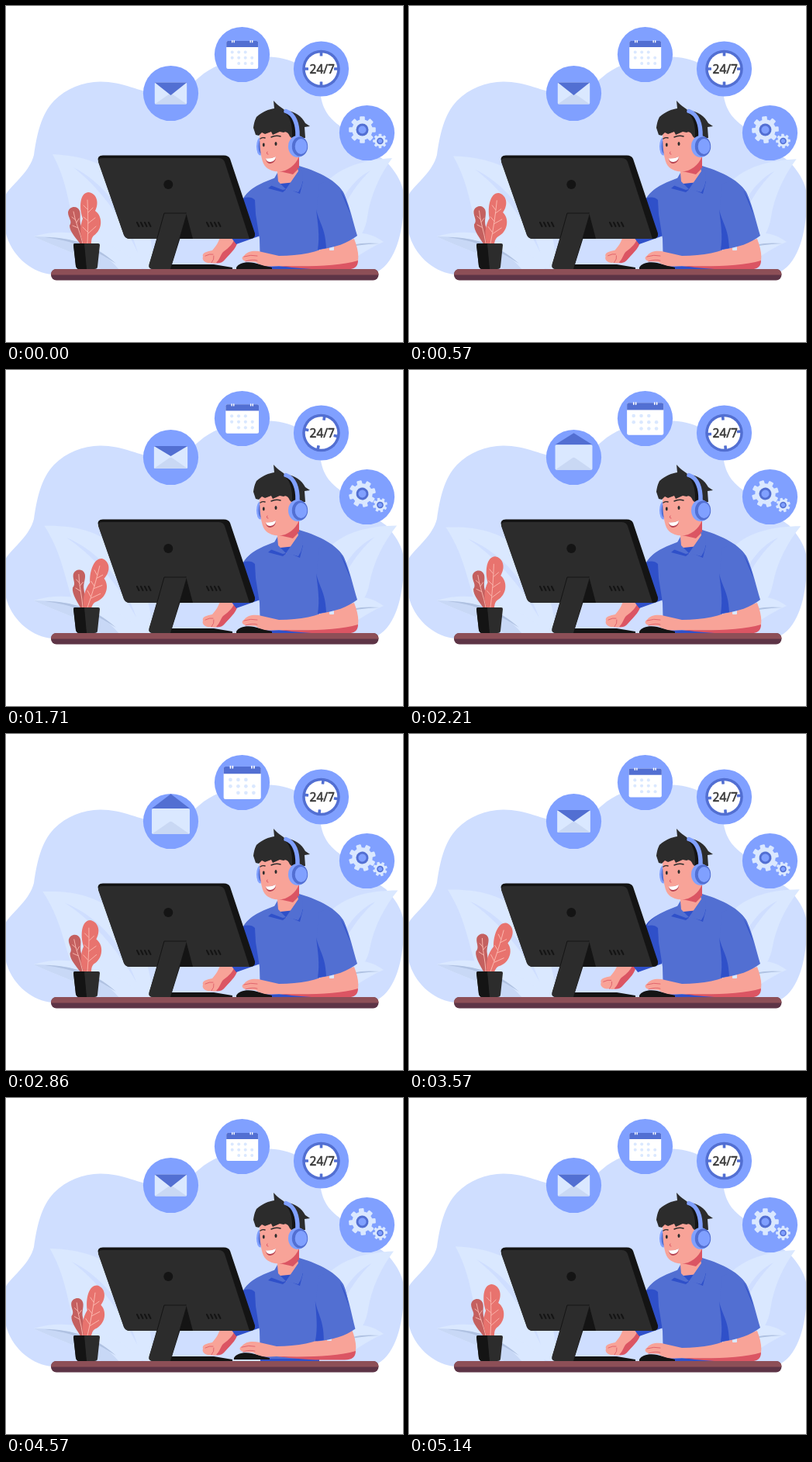
An HTML page with a canvas for the animation above (5210 ms loop, 512x433 px).

```html
<!DOCTYPE html>
<html lang="en">
<head>
<meta charset="utf-8">
<title>Support desk</title>
<style>
html, body { margin: 0; width: 100%; height: 100%; overflow: hidden; background: #fff; }
canvas { display: block; width: 100%; height: 100%; }
</style>
</head>
<body>
<canvas id="stage" width="512" height="433"></canvas>
<script>
const ctx = document.getElementById('stage').getContext('2d');
const LOOP = 5210, TAU = Math.PI * 2;
const C = {
  cloud: '#cfdeff', leaf: '#dae8ff', lowLeaf: '#c8d8f6', vein: '#b0c2e2',
  disc: '#80a0ff', blue: '#526fd2', navy: '#2f50c9', pale: '#dae8ff',
  skin: '#f8a398', red: '#db5563', ink: '#2c2c2c', black: '#141414',
  plant: '#e8736e', plantDark: '#c4605f', plantVein: '#fbb9b0'
};

// Drawing helpers
const paths = {};
const path = d => paths[d] || (paths[d] = new Path2D(d));
function fill(d, color) {
  ctx.fillStyle = color;
  ctx.fill(path(d));
}
function line(d, color, width = 1) {
  ctx.strokeStyle = color;
  ctx.lineWidth = width;
  ctx.lineCap = ctx.lineJoin = 'round';
  ctx.stroke(path(d));
}
function ellipse(x, y, rx, ry, color) {
  ctx.fillStyle = color;
  ctx.beginPath();
  ctx.ellipse(x, y, rx, ry, 0, 0, TAU);
  ctx.fill();
}
const circle = (x, y, r, color) => ellipse(x, y, r, r, color);
function box(x, y, w, h, r, color) {
  ctx.fillStyle = color;
  ctx.beginPath();
  ctx.roundRect(x, y, w, h, r);
  ctx.fill();
}
function at(x, y, draw, angle = 0, scale = 1) {
  ctx.save();
  ctx.translate(x, y);
  ctx.rotate(angle);
  ctx.scale(scale, scale);
  draw();
  ctx.restore();
}
const pivot = (x, y, angle, draw) => at(x, y, () => {
  ctx.translate(-x, -y);
  draw();
}, angle);

// Timing helpers
const clamp = u => Math.min(1, Math.max(0, u));
const span = (t, a, b) => clamp((t - a) / (b - a));
const bump = (t, a, b) => Math.sin(Math.PI * span(t, a, b)) ** 2;
const cubic = u => u < .5 ? 4 * u ** 3 : 1 - 4 * (1 - u) ** 3;
const slowSway = t => Math.sin(Math.PI * t / LOOP) ** 1.4;

function backdrop(t) {
  fill('M60 346C35 344 10 325 1 297C-4 280 -4 255 -1 244C9 228 30 215 36 192C40 165 45 140 62 122C80 104 105 95 132 98C160 101 180 114 206 114C228 114 238 101 249 92C257 85 265 80 275 76C305 66 335 62 358 68C384 74 402 92 406 117C410 138 420 147 434 157C444 182 470 184 490 200C505 216 514 232 513 250C513 288 503 338 470 346Z', C.cloud);
  const sway = slowSway(t);
  pivot(190, 340, -.09 * sway, () => {
    fill('M60 191C100 193 128 203 150 225C180 255 190 300 190 340C150 335 100 320 88 285C80 250 78 225 60 191Z', C.leaf);
    fill('M87 208C122 226 155 262 170 318C148 270 118 232 87 208Z', C.cloud);
  });
  pivot(400, 335, .055 * sway, () => {
    fill('M498 196C460 198 432 208 414 226C398 250 394 300 400 337C435 322 462 304 466 272C470 244 482 218 498 196Z', C.leaf);
    fill('M470 212C442 226 420 264 411 318C426 274 444 236 470 212Z', C.cloud);
  });
  fill('M36 297C62 289 92 290 120 302C150 314 168 328 176 340H124C100 320 66 312 36 297Z', C.leaf);
  fill('M36 297C84 297 120 308 146 340H124C100 320 66 312 36 297Z', C.lowLeaf);
  fill('M50 298C84 298 116 308 142 332C112 312 86 303 50 298Z', C.vein);
  fill('M487 304C468 290 446 288 428 304L420 335C450 330 458 316 487 304Z', C.leaf);
  fill('M482 306C460 304 444 307 432 314C446 309 462 307 482 306Z', C.vein);
}

function envelope(open) {
  at(212.5, 112.5, () => {
    const tip = -14 + 16.5 * Math.cos(Math.PI * open);
    const flap = () => {
      ctx.fillStyle = C.blue;
      ctx.beginPath();
      ctx.moveTo(-20.7, -14);
      ctx.lineTo(0, tip);
      ctx.lineTo(20.7, -14);
      ctx.fill();
    };
    if (tip < -14) flap();
    box(-20.7, -14, 41.4, 28, 1.5, C.pale);
    fill('M-20 13.5L-2 1Q0 -.5 2 1L20 13.5Q19 14 18 14H-18Q-19 14 -20 13.5Z', '#c9d8f4');
    if (tip >= -14) flap();
  }, 0, 1 + .2 * open);
}

function calendar(open) {
  at(304.7, 63, () => {
    box(-20.5, -18, 41, 36, 2, '#fff');
    box(-20.5, -18, 41, 8, [2, 2, 0, 0], C.blue);
    for (const x of [-13, -10.5, 10.5, 13]) box(x - .7, -19, 1.4, 3.5, .7, '#fff');
    for (let row = 0; row < 3; row++)
      for (let col = 0; col < 4; col++) {
        const empty = row === 0 && col === 3 || row === 2 && col === 0;
        if (!empty) circle(-13 + col * 8.5, -3.5 + row * 7.2, 2, C.pale);
      }
  }, 0, 1 + .19 * open);
}

function clock(t) {
  const turn = cubic(span(t, 1350, 2480)) + cubic(span(t, 2480, 3907));
  circle(406.5, 81, 24.3, C.blue);
  circle(406.5, 81, 20.8, '#fff');
  at(406.5, 81, () => {
    for (let i = 0; i < 4; i++) {
      box(-1.8, -22.5, 3.6, 6, .5, C.blue);
      ctx.rotate(Math.PI / 2);
    }
  }, turn * Math.PI / 2);
  ctx.font = '15.5px "Noto Sans", "Open Sans", sans-serif';
  ctx.textAlign = 'center';
  ctx.textBaseline = 'alphabetic';
  ctx.fillStyle = ctx.strokeStyle = '#3a3a3a';
  ctx.lineWidth = .6;
  ctx.fillText('24/7', 407.8, 86.8);
  ctx.strokeText('24/7', 407.8, 86.8);
}

function gear(x, y, r, angle) {
  at(x, y, () => {
    for (let i = 0; i < 8; i++) {
      box(-r * .19, -r, r * .38, r, r * .07, C.pale);
      ctx.rotate(TAU / 8);
    }
    circle(0, 0, r * .76, C.pale);
    circle(0, 0, r * .46, C.blue);
    circle(0, 0, r * .29, C.disc);
  }, angle);
}

function icons(t) {
  const open = bump(t, LOOP / 4, LOOP * 3 / 4);
  for (const [x, y] of [[212.5, 112.5], [304.5, 62.5], [406.5, 81], [465.5, 163.5]])
    circle(x, y, 35.6, C.disc);
  envelope(open);
  calendar(open);
  clock(t);
  const turn = -.31 * slowSway(t);
  gear(459.5, 159.5, 17.3, turn);
  gear(482.5, 174, 9.3, turn);
}

function leftArm(t) {
  const reach = bump(t, 0, 620) + bump(t, 2930, 4000);
  at(-7 * reach, -3 * reach, () => {
    fill('M276 298L300 298C298 310 290 317 284 324C279 331 270 333 264 331C258 332 252 328 254 323C252 318 260 316 266 315C272 308 274 304 276 298Z', C.skin);
    fill('M299 299C300 310 290 318 283 326C279 331 275 332 271 331C276 326 277 320 280 317C288 311 293 306 295 299Z', C.red);
    line('M257 322Q263 319 267 320M265 331Q269 326 268 322', C.red, .8);
  });
  at(-2 * reach, 0, () => {
    fill('M335 228C317 234 308 242 303 254L290 298L297 307L328 296V240Z', C.navy);
  });
}

function torso() {
  fill('M351 220C335 226 316 232 307 247C312 246 318 246 321 250L322 268L327 300L328 339H403L404 314C420 312 440 306 445 296C444 274 440 250 435 240C424 222 398 212 378 206Z', C.blue);
  fill('M328 336H404V339H328Z', C.navy);
  fill('M350 204L378 190V212L361 237L350 228Z', C.skin);
  fill('M378 192V209L370 217C363 215 357 214 352 213C364 210 373 203 378 192Z', C.red);
  fill('M344 230L338 235L357 240L363 235L379 242L383 226Z', C.navy);
  fill('M350 215L341 231L357 237L361 236L351 226Z', C.blue);
  fill('M376 208L377 213L361 236L377 240Q385 229 382 213Z', C.blue);
}

function rightArm(t) {
  const slide = bump(t, 600, 1660) + bump(t, 3800, 5150);
  at(-3.2 * slide, -2 * slide, () => {
    fill('M297 337C300 331 310 329 320 331L343 337V339H297Z', C.black);
    fill('M307 322C312 315 322 315 330 317L352 322C380 322 402 317 420 308L449 300C456 318 456 331 450 336C440 340 380 337 352 335C340 336 330 336 322 330L309 329C303 327 304 323 307 322Z', C.skin);
    fill('M354 335C395 336 430 335 454 328C454 336 449 339.5 440 339.5H402C380 338 366 337 354 335Z', C.red);
    line('M307 323Q316 320 324 322M309 329Q318 326 324 328', C.red, .8);
    box(417, 310, 6, 5, 1, C.pale);
  });
  pivot(415, 230, .04 * slide, () => {
    fill('M403 230C414 222 430 230 436 242C444 260 448 280 453 296C440 306 425 311 404 314L401 262Z', C.blue);
    fill('M400 262C404 280 412 286 413 312L402 314C405 296 402 280 400 262Z', C.navy);
    fill('M431 237C438 248 442 260 444 268C440 258 436 248 431 237Z', C.navy);
  });
}

function head() {
  ellipse(328, 181, 5, 11.5, C.disc);
  ellipse(329.5, 181, 4, 9.5, C.blue);
  fill('M327 160C327 178 328 194 332 203C337 213 350 215 360 212C371 207 378 199 380 186L378 158L350 148Z', C.skin);
  fill('M322 166L319 157C320 150 321 147 323 143C331 136 339 133 346 132L345 122C350 128 356 131 359 134C374 136 381 142 386 151L392 155L385 156L386 170H368L366 168C364 163 361 161 358 163L353 162L344 166L342 162L334 165L330 163L326 167Z', C.ink);
  fill('M356 135C366 140 370 152 369 170H377C378 152 370 138 356 135Z', C.black);
  line('M361 135.5C372 139 376.5 153 376 168', C.disc, 5.5);
  ellipse(376, 181, 12, 14, C.disc);
  ellipse(379, 181, 10.2, 12.6, C.blue);
  ellipse(380.5, 181, 7.8, 10, C.disc);
  ellipse(332.3, 179, 1.4, 2.4, C.ink);
  ellipse(348, 177.5, 1.5, 2.5, C.ink);
  line('M328 171Q331 169 334 170M342 169Q348 166 354 168', C.ink, 1.4);
  line('M337 188Q335 191 338 191', C.red, 1);
  fill('M335 197Q342 197 348 194Q348 202 341 203Q336 203 335 197Z', '#b5404f');
  fill('M335 196.5Q342 197 348 194Q347.5 200 341 201Q336 201 335 196.5Z', '#fff');
}

function monitor() {
  fill('M204 266H235L214 333H268L292 337V339H190Q183 339 185 332Z', C.black);
  fill('M125 192.5H281Q287 192.5 289 197L321 293Q322 300 315 300H160Q154 300 152 295L119 200Q117 192.5 125 192.5Z', C.black);
  fill('M125 196H274Q280 196 282 201L314 300H160Q154 300 152 295L119 201Q118 196 125 196Z', C.ink);
  circle(209.3, 230, 6, C.black);
  for (const x of [169, 259])
    for (let i = 0; i < 4; i++)
      line(`M${x + i * 5} 279l2.5 5`, C.black, 2);
  fill('M232 266L241 300H222Z', C.black);
  fill('M205 267H233L212 339H190Q183 339 184.5 333Z', C.ink);
  line('M195 299L204 267H232', C.black, 1);
}

function plant(t) {
  const lean = (1 - Math.cos(2 * TAU * t / LOOP)) / 2;
  pivot(100, 306, .21 * lean, () => {
    fill('M97 308C91 300 82 291 82 283C86 277 80 273 80 266C81 258 92 256 95 264C97 270 94 276 97 284C100 292 101 300 102 308Z', C.plantDark);
    line('M99 306C96 292 89 278 87 265M90 276l-5 -4M93 286l-7 -3M91 279l3 -5', C.plantVein, .9);
  });
  pivot(104, 306, .37 * lean, () => {
    fill('M101 308C95 296 95 284 99 274C94 260 95 241 106 240C116 241 121 252 115 264C125 271 125 288 113 296C110 299 110 303 110 308Z', C.plant);
    line('M105 306C106 288 106 268 105 250M106 266l6 -6M105 262l-5 -5M106 280l9 -7M106 277l-6 -5M106 293l10 -9M105 291l-6 -6', C.plantVein, .9);
  });
  fill('M87 308Q87 306 89 306H119Q121 306 121 308L118 336Q118 339 114 339H94Q91 339 90 335Z', C.ink);
  fill('M104 339H94Q91 339 90 335L87 308Q87 306 89 306H101Z', C.black);
}

function desk() {
  box(58, 339, 422.5, 14.5, 7, '#5d3446');
  box(58, 339, 422.5, 7.5, [7, 7, 1, 1], '#8d4f57');
}

function render(t) {
  ctx.fillStyle = '#fff';
  ctx.fillRect(0, 0, 512, 433);
  backdrop(t);
  icons(t);
  leftArm(t);
  torso();
  head();
  rightArm(t);
  monitor();
  plant(t);
  desk();
}

let start;
function tick(now) {
  start ??= now;
  render((now - start) % LOOP);
  requestAnimationFrame(tick);
}
render(0);
requestAnimationFrame(tick);
</script>
</body>
</html>
```
